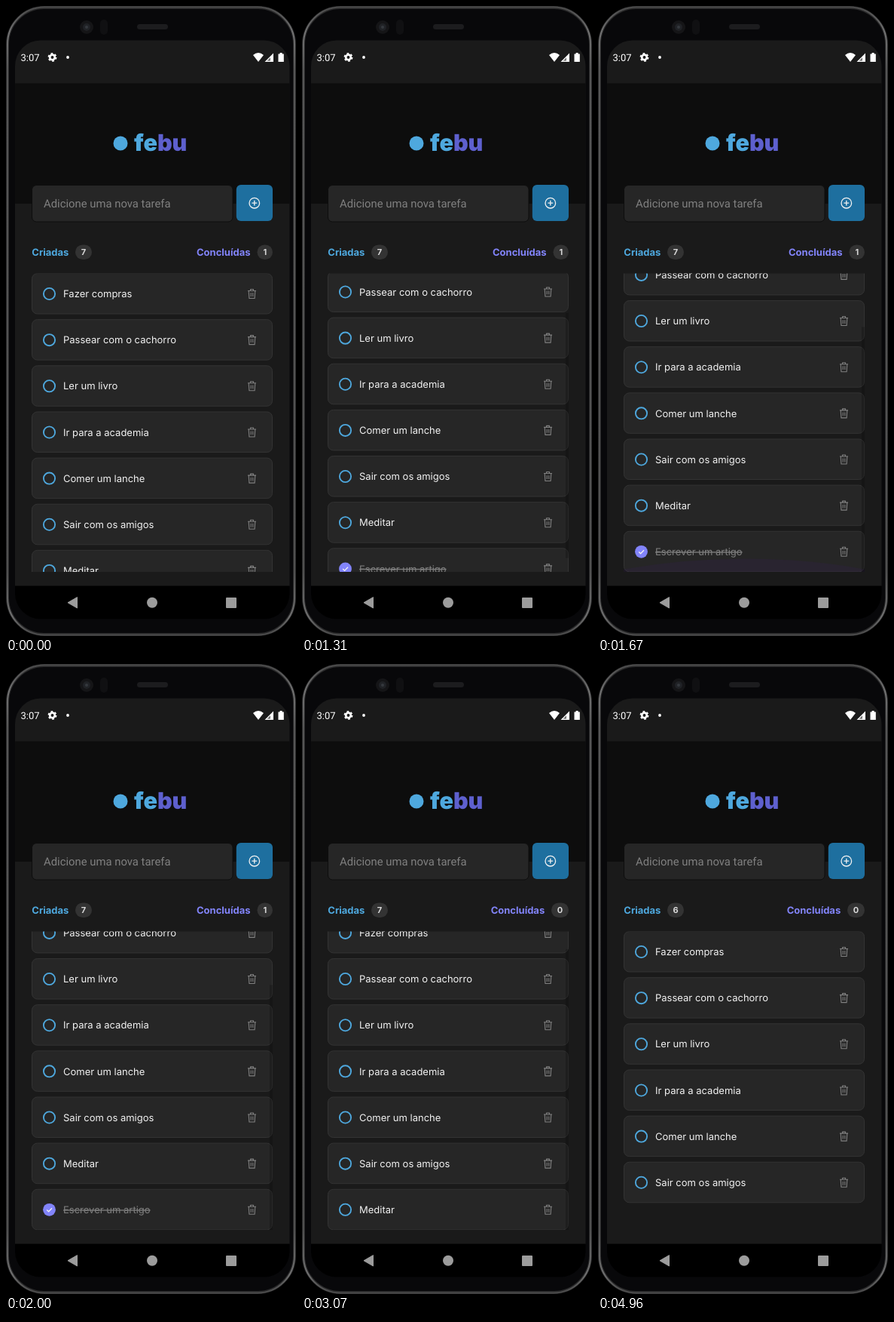
An HTML page for the animation above (7.04 s loop, 385 by 835 pixels).

```html
<!DOCTYPE html>
<html lang="pt-BR">
<head>
<meta charset="utf-8">
<title>Lista de tarefas</title>
<style>
  html, body { margin: 0; width: 100%; height: 100%; overflow: hidden; background: #000; }
  svg { display: block; width: 385px; height: 835px; }
  text { font-family: Inter, "Open Sans", sans-serif; font-size: 13px; text-rendering: geometricPrecision; }
  .system { font-family: Roboto, sans-serif; }
  .bold { font-weight: 700; }
  .badge { font-size: 11px; font-weight: 700; fill: #d9d9d9; text-anchor: middle; }
</style>
</head>
<body>
<svg viewBox="0 0 385 835" xmlns="http://www.w3.org/2000/svg">
  <defs>
    <linearGradient id="rim" x1="0" y1="0" x2="0" y2="1">
      <stop offset="0" stop-color="#4a4a4a"/>
      <stop offset=".04" stop-color="#747474"/>
      <stop offset=".1" stop-color="#565656"/>
      <stop offset=".9" stop-color="#505050"/>
      <stop offset=".97" stop-color="#707070"/>
      <stop offset="1" stop-color="#4a4a4a"/>
    </linearGradient>
    <clipPath id="screen"><rect x="12" y="45.5" width="364.5" height="767" rx="34"/></clipPath>
    <clipPath id="view"><rect x="34" y="354.5" width="320" height="395.5"/></clipPath>
    <g id="trash" fill="none" stroke="#808080" stroke-width="1.1" stroke-linejoin="round">
      <path d="M-5.5 -4H5.5M-4.3 -4L-3.6 6H3.6L4.3 -4M-2 -4V-6H2V-4M-1.3 -1.4V3.4M1.3 -1.4V3.4"/>
    </g>
  </defs>

  <!-- Phone body -->
  <rect width="385" height="835" fill="#000"/>
  <rect x="2" y="2" width="381" height="831" rx="49" fill="#08080a" stroke="#2a2a2b" stroke-width="4"/>
  <rect x="2" y="1.5" width="381" height="832" rx="49" fill="none" stroke="url(#rim)" stroke-width="2"/>
  <circle cx="107" cy="28" r="9" fill="#151517"/>
  <circle cx="107" cy="28" r="5" fill="#202226"/>
  <circle cx="107" cy="28" r="2" fill="#34383e"/>
  <rect x="125" y="18" width="10" height="20" rx="5" fill="#101012"/>
  <rect x="174" y="24" width="41" height="7" rx="3.5" fill="#1c1c1e"/>

  <g clip-path="url(#screen)">
    <rect x="12" y="45" width="365" height="724" fill="#1a1a1a"/>
    <rect x="12" y="102.5" width="365" height="159.5" fill="#0d0d0d"/>
    <rect x="12" y="768.5" width="365" height="45" fill="#000"/>
  </g>

  <!-- Status bar -->
  <g fill="#fff">
    <text class="system" x="19.5" y="73">3:07</text>
    <circle cx="61.5" cy="68" r="3.3" fill="none" stroke="#fff" stroke-width="2.7"/>
    <circle cx="61.5" cy="68" r="5.1" fill="none" stroke="#fff" stroke-width="1.7" stroke-dasharray="2.7 2.64"/>
    <circle cx="82" cy="68" r="1.9"/>
    <path d="M328 65Q335 59.2 342 65L335 74ZM343.5 74L355 62.5V74Z"/>
    <path d="M361.5 63.5H363.6V62H366.6V63.5H368.8V74H361.5Z"/>
  </g>
  <path d="M346.5 72.8L351 68.3V72.8Z" fill="#1a1a1a" opacity=".6"/>

  <!-- Header -->
  <circle cx="152" cy="182" r="9.5" fill="#4ea8de"/>
  <text x="170" y="192" style="font-size:30.5px;font-weight:900" fill="#4ea8de">fe<tspan fill="#5e60ce">bu</tspan></text>
  <rect x="34.5" y="237.5" width="266.5" height="48.5" rx="6" fill="#262626" stroke="#0d0d0d"/>
  <text class="system" x="50" y="267" style="font-size:14.85px" fill="#808080">Adicione uma nova tarefa</text>
  <rect x="305.8" y="237" width="48.2" height="48" rx="6" fill="#1e6f9f"/>
  <g fill="none" stroke="#f2f2f2" stroke-width="1.3">
    <circle cx="329.8" cy="261.2" r="6.8"/>
    <path d="M326.4 261.2H333.2M329.8 257.8V264.6"/>
  </g>

  <!-- Counters -->
  <text class="bold" x="34.3" y="331" fill="#4ea8de">Criadas</text>
  <rect x="92" y="316.5" width="22" height="19.5" rx="9.75" fill="#333"/>
  <text class="badge" id="created" x="103" y="330.4"></text>
  <text class="bold" id="doneLabel" y="331" fill="#8284fa">Concluídas</text>
  <rect id="donePill" y="316.5" height="19.5" rx="9.75" fill="#333"/>
  <text class="badge" id="done" y="330.4"></text>

  <!-- Task list -->
  <g clip-path="url(#view)">
    <g id="list"></g>
    <path id="glow" fill="#411983"/>
    <rect id="thumb" x="350" width="4" fill="#000"/>
  </g>

  <!-- Navigation bar -->
  <g fill="#9c9c9c">
    <path d="M82 790.8L94.5 783.6V798Z" stroke="#9c9c9c" stroke-linejoin="round"/>
    <circle cx="194" cy="790.8" r="7"/>
    <rect x="292" y="784" width="14" height="14" rx="1"/>
  </g>
</svg>

<script>
const LOOP = 7040, STEP = 30;
const TOP = 354.5, BOTTOM = 750.3, PITCH = 61.15, CARD = 54;
const FLING = 1250, HIT = 1340, SETTLE = 1880;
const PRESS_1 = 2740, DELETE_1 = 3070, PRESS_2 = 4730, DELETE_2 = 4960;
const TASKS = ["Fazer compras", "Passear com o cachorro", "Ler um livro", "Ir para a academia",
  "Comer um lanche", "Sair com os amigos", "Meditar", "Escrever um artigo"];

const $ = id => document.getElementById(id);
const set = (node, attrs) => {
  for (const key in attrs) node.setAttribute(key, attrs[key]);
};
const clamp = (v, lo, hi) => Math.min(hi, Math.max(lo, v));

function cardMarkup(label, i) {
  const done = i === TASKS.length - 1;
  const mark = done
    ? `<circle cx="57.5" cy="27" r="8.4" fill="#8284fa"/>
       <path d="M54.2 27.2L56.6 29.5L61 24.9" fill="none" stroke="#f2f2f2" stroke-width="1.3"/>`
    : `<circle cx="57.5" cy="27" r="7.6" fill="none" stroke="#4ea8de" stroke-width="1.85"/>`;
  const look = done ? 'fill="#808080" text-decoration="line-through"' : 'fill="#f2f2f2"';
  return `<g>
    <rect x="34.5" width="319" height="${CARD - 0.5}" rx="7" fill="#262626" stroke="#333"/>
    ${mark}
    <text x="76" y="31.7" ${look}>${label}</text>
    <use href="#trash" x="326.5" y="27"/>
  </g>`;
}

$("list").innerHTML = TASKS.map(cardMarkup).join("");
const cards = [...$("list").children];
const bins = cards.map(card => card.querySelector("use"));

function scrollAt(t, max) {
  if (t < FLING) return 0;
  const step = Math.floor((t - FLING) / STEP);
  return Math.min(max, 18.5 + 22.6 * step);
}

// Overscroll glow: swells for a moment, then recedes.
function drawGlow(t) {
  const on = t >= HIT && t < SETTLE;
  const now = Math.floor((t - HIT) / STEP) * STEP;
  const swell = 1 + 0.2 * clamp(now / 90, 0, 1);
  const fade = 1 - clamp((now - 90) / (SETTLE - HIT - 90), 0, 1);
  const size = swell * fade;
  const side = BOTTOM - 7 * size, crest = BOTTOM - 57 * size;
  set($("glow"), {
    d: `M34 ${BOTTOM}V${side}Q194 ${crest} 354 ${side}V${BOTTOM}Z`,
    opacity: on ? 0.16 * Math.sqrt(fade) : 0
  });
}

function drawThumb(t, scroll, height) {
  const view = BOTTOM - TOP, ratio = view / height;
  set($("thumb"), {
    y: TOP + scroll * ratio,
    height: Math.min(view, view * ratio),
    opacity: t >= FLING && t < DELETE_2 ? 0.2 : 0
  });
}

function drawCounters(created, done) {
  const left = done ? 333.5 : 331;
  $("created").textContent = created;
  $("done").textContent = done;
  set($("doneLabel"), { x: done ? 253 : 250.7 });
  set($("donePill"), { x: left, width: 354 - left });
  set($("done"), { x: (left + 354) / 2 });
}

function render(t) {
  const count = t < DELETE_1 ? 8 : t < DELETE_2 ? 7 : 6;
  const height = (count - 1) * PITCH + CARD;
  const scroll = scrollAt(t, Math.max(0, height - (BOTTOM - TOP)));
  cards.forEach((card, i) => {
    set(card, {
      transform: `translate(0 ${TOP + i * PITCH - scroll})`,
      visibility: i < count ? "visible" : "hidden"
    });
  });
  set(bins[7], { opacity: t >= PRESS_1 ? 0.7 : 1 });
  set(bins[6], { opacity: t >= PRESS_2 ? 0.7 : 1 });
  drawGlow(t);
  drawThumb(t, scroll, height);
  drawCounters(Math.min(count, 7), count === 8 ? 1 : 0);
}

const start = performance.now();
function tick() {
  render((performance.now() - start) % LOOP);
  requestAnimationFrame(tick);
}
tick();
</script>
</body>
</html>
```
